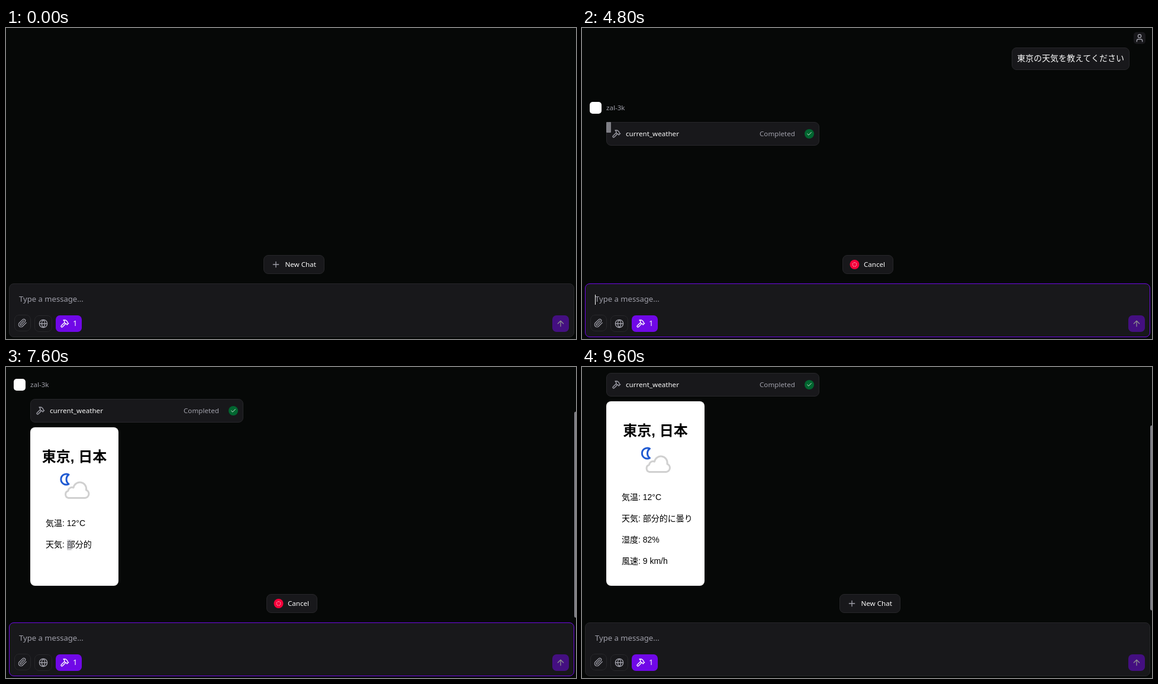
An HTML page for the animation above (9.8 s loop, 963x526 px).

```html
<!DOCTYPE html>
<html lang="ja">
<head>
<meta charset="utf-8">
<title>Chat</title>
<style>
  html, body { margin: 0; width: 100%; height: 100%; overflow: hidden; background: #060807; }
  svg { display: block; }
  text { font-family: "Noto Sans", "Noto Sans CJK JP", sans-serif; fill: #fafafa; white-space: pre; }
  .jp { font: 14px "Noto Sans CJK JP", sans-serif; }
  .label { font-size: 11.6px; font-weight: 500; }
  .muted { fill: #9f9fa9; }
  .panel { fill: #18181b; stroke: #27272a; }
  .card text { font-family: "Liberation Sans", "Noto Sans CJK JP", sans-serif; font-size: 14px; fill: #000; }
  .card .title { font-size: 24px; font-weight: 700; text-anchor: middle; }
  .icon { fill: none; stroke: #9f9fa9; stroke-width: 2; stroke-linecap: round; stroke-linejoin: round; }
  .white { stroke: #fff; }
  .weather { fill: none; stroke-width: 3; stroke-linejoin: round; }
</style>
</head>
<body>
<svg width="963" height="526" viewBox="0 0 963 526">
  <defs>
    <path id="clip" d="m21.44 11.05-9.19 9.19a6 6 0 0 1-8.49-8.49l8.57-8.57A4 4 0 1 1 18 8.84l-8.59 8.57a2 2 0 0 1-2.83-2.83l8.49-8.48"/>
    <path id="globe" d="M2 12a10 10 0 1 0 20 0 10 10 0 1 0-20 0M12 2a14.5 14.5 0 0 0 0 20 14.5 14.5 0 0 0 0-20M2 12h20"/>
    <path id="hammer" d="m15 12-8.373 8.373a1 1 0 1 1-3-3L12 9m6 6 4-4m-.5.5-1.914-1.914A2 2 0 0 1 19 8.172V7l-2.26-2.26a6 6 0 0 0-4.202-1.756L9 2.96l.92.82A6.18 6.18 0 0 1 12 8.4V10l2 2h1.172a2 2 0 0 1 1.414.586L18.5 14.5"/>
    <path id="person" d="M19 21v-2a4 4 0 0 0-4-4H9a4 4 0 0 0-4 4v2M8 7a4 4 0 1 0 8 0 4 4 0 1 0-8 0"/>
    <path id="plus" d="M5 12h14M12 5v14"/>
    <path id="check" d="M20 6 9 17l-5-5"/>
    <path id="arrow" d="m5 12 7-7 7 7M12 19V5"/>
  </defs>

  <g id="chat">
    <g id="question">
      <rect x="932" y="7" width="20" height="20" rx="5" fill="#18181b"/>
      <use href="#person" class="icon" transform="translate(934 9) scale(.667)"/>
      <rect class="panel" x="726.5" y="33.5" width="198" height="37" rx="7.5"/>
      <text class="jp" x="735" y="56">東京の天気を教えてください</text>
    </g>
    <rect x="13" y="125" width="20" height="20" rx="5" fill="#fff"/>
    <text class="label muted" x="41" y="139">zal-3k</text>
    <g id="tool">
      <rect class="panel" x="41.5" y="159.5" width="359" height="39" rx="7.5"/>
      <use href="#hammer" class="icon" transform="translate(50 171) scale(.667)"/>
      <text class="label" x="74" y="183">current_weather</text>
      <text class="muted" x="300" y="183" font-size="11.65">Completed</text>
      <circle cx="384" cy="179" r="8" fill="#016630"/>
      <use href="#check" class="icon white" transform="translate(379 174) scale(.417)" stroke-width="3"/>
    </g>
    <g id="card" class="card" transform="translate(41 207)">
      <rect id="paper" rx="8" fill="#fff"/>
      <g id="center">
        <text id="title" class="title" y="58"></text>
        <path id="moon" class="weather" stroke="#1f5ad2" d="M-9.5 80A9 9 0 1 0-9.5 96A10 10 0 0 1-9.5 80Z"/>
        <path id="cloud" class="weather" stroke="#d0d0d0" d="M-10 119.5H18A7 7 0 0 0 20 106A10.9 10.9 0 0 0-1.5 102A6.5 6.5 0 0 0-10.5 107.5A6.2 6.2 0 0 0-10 119.5Z"/>
      </g>
      <g id="facts"></g>
    </g>
  </g>
  <rect id="block" width="8" height="18" rx="1" fill="#a1a1aa"/>
  <rect id="thumb" x="960" width="6" rx="3" fill="#7f7f86"/>

  <g id="newChat">
    <rect class="panel" x="435.5" y="384.5" width="102" height="31" rx="7.5"/>
    <use href="#plus" class="icon" transform="translate(448 392) scale(.667)"/>
    <text class="label" x="471.5" y="404">New Chat</text>
  </g>
  <g id="cancel">
    <rect class="panel" x="440.5" y="384.5" width="85" height="31" rx="7.5"/>
    <circle cx="460.5" cy="400" r="8" fill="#f4003a"/>
    <rect x="457.3" y="396.8" width="6.4" height="6.4" rx="2.4" fill="none" stroke="#ffc4d0" stroke-dasharray="2 .8"/>
    <text class="label" x="476" y="404">Cancel</text>
  </g>

  <rect id="input" class="panel" x="5.5" y="432.5" width="954" height="90" rx="7.5"/>
  <text id="placeholder" class="muted" x="22" y="463" font-size="13.1">Type a message...</text>
  <text id="draft" class="jp" x="22" y="463">東京の天気を教えてください</text>
  <rect id="caret" y="451" width="1" height="17" fill="#fff"/>
  <rect class="panel" x="14.5" y="485.5" width="27" height="27" rx="7.5"/>
  <use href="#clip" class="icon" transform="translate(20 491) scale(.667)"/>
  <rect class="panel" x="48.5" y="486.5" width="29" height="27" rx="7.5"/>
  <use href="#globe" class="icon" transform="translate(55 492) scale(.667)"/>
  <rect x="84" y="486" width="44" height="28" rx="7" fill="#7008e7"/>
  <use href="#hammer" class="icon white" transform="translate(91 492) scale(.667)"/>
  <text x="113" y="504" font-size="13">1</text>
  <g id="send">
    <rect x="923" y="486" width="28" height="28" rx="7" fill="#7008e7"/>
    <use href="#arrow" class="icon white" transform="translate(929 492) scale(.667)"/>
  </g>
</svg>
<script>
const LOOP = 9800, FOCUS = 3000, PASTE = 3300, SEND = 3600, TOOL = 4300,
      WAIT = 5300, ANSWER = 6800, DONE = 8000, IDLE = 9000, BLUR = 9600;
const TITLE = '東京, 日本';
const FACTS = ['気温: 12°C', '天気: 部分的に曇り', '湿度: 82%', '風速: 9 km/h'];

// start time, card width, card height, title length, icon parts, fact characters, block x, block y
const STAGES = [
  [6800, 88, 96, 2, 0, 0, 20, 35],
  [6900, 149, 96, 6, 0, 0, 83, 35],
  [7100, 149, 196, 6, 1, 0, 83, 35],
  [7300, 149, 196, 6, 2, 0, 83, 35],
  [7500, 149, 232, 6, 2, 8, 62, 154],
  [7600, 149, 268, 6, 2, 15, 62, 190],
  [7700, 166, 268, 6, 2, 19, 62, 190],
  [7800, 166, 304, 6, 2, 26, 62, 226],
  [7900, 166, 312, 6, 2, 31, 62, 262],
  [8000, 166, 312, 6, 2, 36, 0, 318]
];

const $ = id => document.getElementById(id);
const set = (id, attrs) => {
  for (const name in attrs) $(id).setAttribute(name, attrs[name]);
};
const show = (id, on) => set(id, { visibility: on ? 'visible' : 'hidden' });
const move = (id, x, y) => set(id, { transform: `translate(${x} ${y})` });
const within = (t, from, to) => t >= from && t < to;

const factLines = FACTS.map((_, i) => {
  const line = document.createElementNS('http://www.w3.org/2000/svg', 'text');
  line.setAttribute('x', 26);
  line.setAttribute('y', 167 + 36 * i);
  return $('facts').appendChild(line);
});

function drawInput(t) {
  const focused = within(t, FOCUS, BLUR), drafting = within(t, PASTE, SEND);
  const caretOn = t < PASTE + 100 || Math.floor((t - 3400) / 600) % 2 === 0;
  $('input').style.stroke = focused ? '#7008e7' : '';
  show('placeholder', !drafting);
  show('draft', drafting);
  show('caret', focused && caretOn);
  set('caret', { x: drafting ? 204 : 22 });
  set('send', { opacity: drafting ? 1 : 0.5 });
  const busy = within(t, SEND, IDLE);
  show('cancel', busy);
  show('newChat', !busy);
}

function drawChat(t) {
  $('chat').style.display = t >= SEND ? '' : 'none';
  $('tool').style.display = t >= TOOL ? '' : 'none';
  const stage = STAGES.filter(s => s[0] <= t).pop();
  $('card').style.display = stage ? '' : 'none';
  const [, width, height, titleLength, iconParts, chars, blockX, blockY] =
    stage || [0, 0, 0, 0, 0, 0, 0, -48];

  set('paper', { width, height });
  move('center', width / 2, 0);
  $('title').textContent = TITLE.slice(0, titleLength);
  $('moon').style.display = iconParts > 0 ? '' : 'none';
  $('cloud').style.display = iconParts > 1 ? '' : 'none';
  let left = chars;
  FACTS.forEach((fact, i) => {
    factLines[i].textContent = fact.slice(0, Math.max(0, left));
    left -= fact.length;
  });

  // The view follows the end of the answer; its top 9 px lie above the stage.
  const view = 433, scroll = Math.max(0, height - 163);
  const content = view + scroll + (t >= DONE ? 17 : 0);
  move('chat', 0, -scroll);
  move('question', scroll ? -8 : 0, 0);
  show('thumb', scroll > 0);
  set('thumb', { y: view * scroll / content - 9, height: view * view / content });

  const pulse = (1 + Math.cos((t - 4800) / 1000 * 2 * Math.PI)) / 2;
  show('block', within(t, SEND, WAIT) || within(t, ANSWER, DONE) || within(t, 8500, 9100));
  move('block', 41 + blockX, 207 + blockY - scroll);
  set('block', { opacity: 0.75 * pulse });
}

function frame(now) {
  const t = Math.floor(now % LOOP / 100) * 100;
  drawInput(t);
  drawChat(t);
  requestAnimationFrame(frame);
}
frame(performance.now());
</script>
</body>
</html>
```
